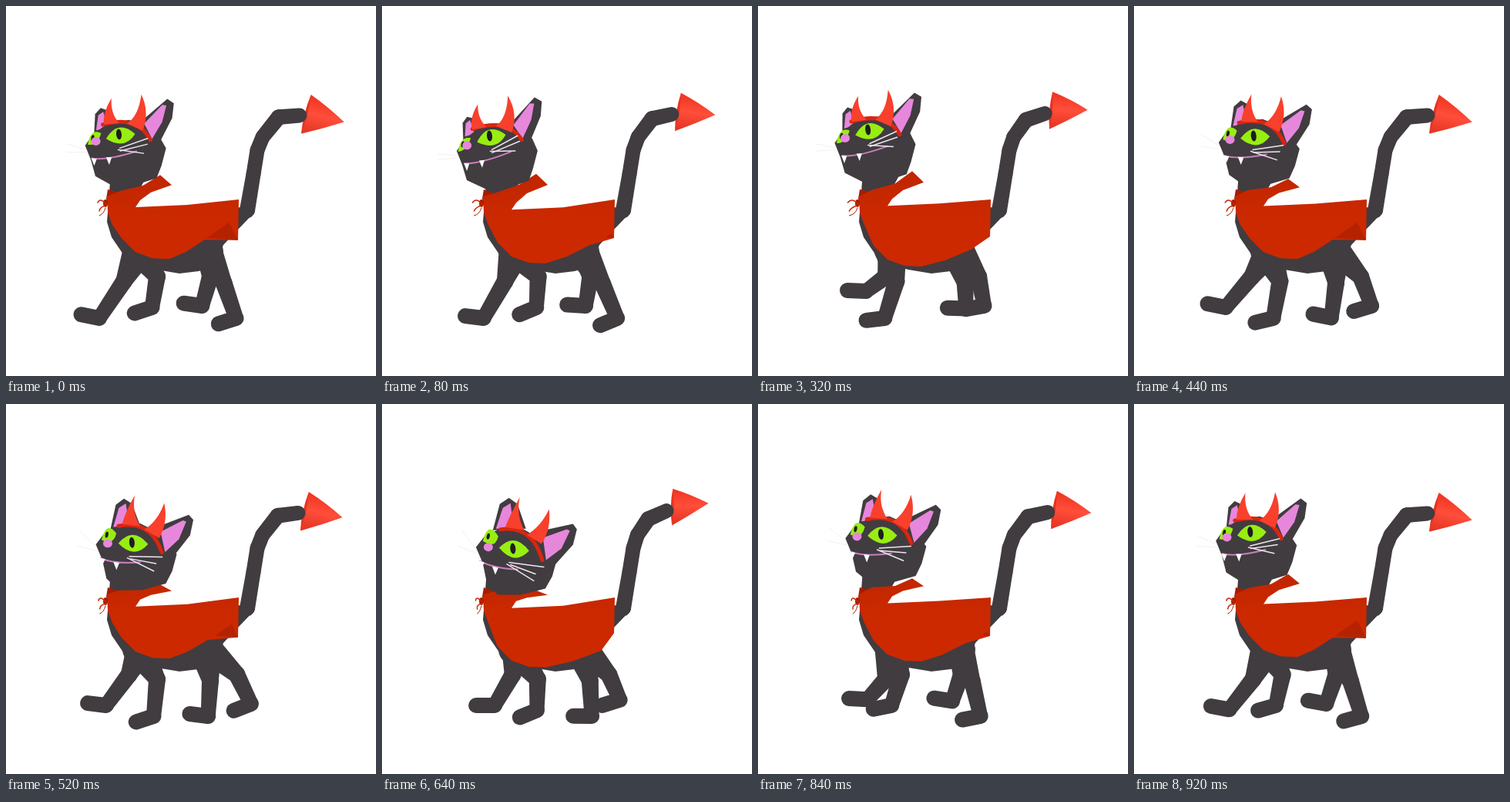
These frames come from a looping animation (480x480 px, 0.96 s). An HTML page with a canvas:

```html
<!DOCTYPE html>
<html lang="en">
<head>
<meta charset="utf-8">
<title>Walking devil cat</title>
<style>
html, body { margin: 0; width: 480px; height: 480px; overflow: hidden; background: #fff; }
canvas { display: block; }
</style>
</head>
<body>
<canvas id="stage" width="480" height="480"></canvas>
<script>
const ctx = document.getElementById('stage').getContext('2d');
const LOOP = 960, STEP = 40, STANCE = 0.63;
const FUR = '#403c40', CAPE = '#cc2900', CAPE_DARK = '#a51d00', RED = '#f8402c',
  PINK = '#e687db', GREEN = '#98ee12', INK = '#201c20';

// root: fixed joint; knee and heel: middle x, swing, y; rise: foot lift; lead: ms ahead in the gait
const LEGS = {
  frontFar: { root: [174, 320, 19], knee: [178, 25, 351], heel: [160, 41, 391], rise: 24, lead: 520 },
  rearFar: { root: [264, 319, 18], knee: [281, 20, 351], heel: [284, 37, 389], rise: 7, lead: 60 },
  frontNear: { root: [172, 318, 21], knee: [178, 25, 357], heel: [162, 41, 405], rise: 25, lead: 0 },
  rearNear: { root: [259, 318, 22], knee: [274, 12, 359], heel: [281, 25, 405], rise: 14, lead: 515 }
};

// Cosine that peaks at the given time, with the given number of cycles per loop.
const wave = (t, peak, cycles = 1) => Math.cos(2 * Math.PI * cycles * (t - peak) / LOOP);

function poly(p, fill) {
  ctx.beginPath();
  for (let i = 0; i < p.length; i += 2) ctx.lineTo(p[i], p[i + 1]);
  ctx.closePath();
  ctx.fillStyle = fill;
  ctx.fill();
}

// Two curves: start, control, end, control, finish (the start by default).
function leaf(p, fill) {
  ctx.beginPath();
  ctx.moveTo(p[0], p[1]);
  ctx.quadraticCurveTo(p[2], p[3], p[4], p[5]);
  ctx.quadraticCurveTo(p[6], p[7], p[8] ?? p[0], p[9] ?? p[1]);
  ctx.fillStyle = fill;
  ctx.fill();
}

function curve(p, color, width) {
  ctx.beginPath();
  ctx.moveTo(p[0], p[1]);
  ctx.quadraticCurveTo(p[2], p[3], p[4], p[5]);
  ctx.strokeStyle = color;
  ctx.lineWidth = width;
  ctx.stroke();
}

function line([ax, ay, bx, by], color, width) {
  curve([ax, ay, ax, ay, bx, by], color, width);
}

function oval([x, y], rx, ry, fill, tilt = 0) {
  ctx.beginPath();
  ctx.ellipse(x, y, rx, ry, tilt, 0, 7);
  ctx.fillStyle = fill;
  ctx.fill();
}

// Tapered tube through [x, y, radius] joints.
function limb(joints) {
  ctx.fillStyle = FUR;
  for (let i = 1; i < joints.length; i++) {
    const [ax, ay, ar] = joints[i - 1], [bx, by, br] = joints[i];
    const dir = Math.atan2(by - ay, bx - ax), q = Math.PI / 2;
    ctx.beginPath();
    ctx.arc(ax, ay, ar, dir + q, dir + 3 * q);
    ctx.arc(bx, by, br, dir - q, dir + q);
    ctx.fill();
  }
}

// The foot slides back evenly on the ground, then swings forward in an arc.
function drawLeg({ root, knee, heel, rise, lead }, t) {
  const phase = (t + lead) / LOOP % 1;
  const swing = Math.max(0, (phase - STANCE) / (1 - STANCE)) * Math.PI;
  const reach = swing ? Math.cos(swing) : 2 * phase / STANCE - 1;
  const x = heel[0] + heel[1] * reach, y = heel[2] - rise * Math.sin(swing);
  const tilt = 0.1 + 0.3 * reach;
  limb([root, [knee[0] + knee[1] * reach, knee[2], 11], [x, y, 9.5]]);
  limb([[x, y, 10], [x - 24 * Math.cos(tilt), y + 24 * Math.sin(tilt), 10]]);
}

function drawTail(bob) {
  const ax = 385 + 11 * bob, ay = 112 + 3 * bob;
  const bx = 430 + 9 * bob, by = 138 + 13 * bob;
  const cx = 379 + 4 * bob, cy = 161 + 5 * bob;
  const shade = ctx.createLinearGradient(ax, ay, cx, cy);
  shade.addColorStop(0, '#ee3420');
  shade.addColorStop(0.45, '#ff4e3a');
  shade.addColorStop(1, '#e03220');
  leaf([ax, ay, (ax + bx) / 2 + 1, (ay + by) / 2 - 2, bx, by, (bx + cx) / 2, (by + cy) / 2 + 1, cx, cy], shade);
  leaf([ax, ay, (ax + cx) / 2 - 4, (ay + cy) / 2, cx, cy, (ax + cx) / 2 + 4, (ay + cy) / 2], '#e83420');
  limb([[313, 265, 10], [321, 218, 9.5], [326, 187, 9.5], [332 + bob, 170, 9.5],
    [349 + 5 * bob, 147 - 3 * bob, 10], [374 + 7 * bob, 140 + 2 * bob, 9.5]]);
  poly([298, 262, 323, 258, 323, 267, 299, 292], FUR);
}

function drawCloak(t, bob, lift, turn) {
  const tipY = 231 + 17 * turn + 0.5 * lift, collarY = 216 + 26 * turn + 0.6 * lift;
  const backY = 265 + 0.5 * lift, lowY = 300 + 4 * bob;
  const hemX = 273 - 16 * bob, hemY = 313 - 10 * bob, base = 336 - 8 * bob;
  const shade = ctx.createLinearGradient(0, 220, 0, 275);
  shade.addColorStop(0, '#c02600');
  shade.addColorStop(1, CAPE);
  poly([132, 238, 166, backY - 14, 168, backY, 136, 272, 130, 250], CAPE_DARK);
  poly([131, 247, 148, 243 + 0.4 * lift, 178, (collarY + 246) / 2, 200, collarY, 215, tipY,
    188, (backY + tipY) / 2 - 5, 174, backY - 9, 168, backY, 235, backY - 3, 302, 251,
    301, lowY, hemX, hemY, (hemX + 210) / 2, (hemY + base) / 2 + 3, 212, base, 190, base - 1,
    168, base - 9, 150, base - 27, 138, 284, 132, 268], shade);
  const fold = Math.max(0, bob);
  poly([301, lowY, 301 - 12 * fold, lowY - 24 * fold, 301 - 42 * fold, lowY - 3 * fold], '#b52200');
  const sway = 3 * wave(t, 240);
  oval([129, 256], 3, 5, CAPE_DARK);
  curve([130, 257, 122, 248, 119 - sway, 255], CAPE, 1.5);
  curve([130, 259, 122, 260, 121 - sway, 266], CAPE, 1.5);
  curve([129, 262, 127, 270, 121 - sway, 272], CAPE_DARK, 1);
}

// Every head part blends from its place facing left to its place turned to the viewer.
function drawHead(lift, turn) {
  const mix = (left, right) =>
    left.map((v, i) => v + (right[i] - v) * turn + (i % 2 ? lift : 0));

  line(mix([68, 197, 95, 197], [103, 163, 121, 187]), '#f5eff4', 1);
  line(mix([70, 203, 97, 199], [99, 185, 122, 194]), '#f5eff4', 1);

  // Far ear, skull, near ear
  poly(mix([101, 178, 99, 156, 104, 148, 111, 149, 122, 166],
    [144, 164, 153, 130, 165, 122, 176, 130, 187, 162]), FUR);
  poly(mix([103, 172, 103, 156, 108, 152, 111, 158, 115, 168],
    [148, 162, 157, 135, 167, 129, 169, 145, 166, 162]), PINK);
  poly(mix(
    [94, 190, 101, 208, 107, 227, 133, 238, 160, 237, 188, 227, 193, 211,
      199, 188, 193, 172, 178, 160, 150, 153, 120, 161, 103, 176],
    [122, 186, 131, 207, 136, 232, 150, 248, 180, 248, 212, 240, 221, 224,
      227, 202, 212, 188, 205, 175, 180, 161, 155, 161, 133, 172]), FUR);
  poly(mix([160, 155, 192, 116, 202, 121, 201, 140, 188, 175, 174, 174],
    [207, 165, 248, 156, 253, 163, 248, 183, 222, 212, 209, 202]), FUR);
  poly(mix([166, 154, 186, 124, 192, 124, 189, 145, 179, 170],
    [209, 174, 240, 163, 244, 165, 233, 188, 213, 203]), PINK);

  // Headband and horns
  curve(mix([113, 161, 160, 145, 178, 172], [154, 163, 195, 157, 208, 203]), '#d8260f', 5);
  leaf(mix([112, 162, 107, 147, 118, 130, 118, 148, 130, 158],
    [160, 160, 166, 145, 179, 121, 174, 145, 185, 164]), RED);
  leaf(mix([143, 156, 157, 146, 157, 116, 172, 138, 164, 164],
    [188, 170, 206, 160, 217, 137, 220, 163, 207, 182]), RED);

  // Eyes and nose
  leaf(mix([95, 192, 97, 172, 111, 173, 106, 190], [131, 178, 138, 151, 151, 172, 147, 189]), GREEN);
  oval(mix([101, 182], [138, 172]), 2, 4, INK, 0.2);
  leaf(mix([120, 177, 133, 149, 157, 166, 146, 188], [152, 187, 172, 166, 191, 191, 172, 211]), GREEN);
  oval(mix([136, 168], [170, 188]), 3.5, 7, INK, -0.1);
  oval(mix([107, 182], [138, 186]), 6, 5.5, PINK);

  // Mouth, fangs and whiskers
  curve(mix([105, 206, 125, 206, 166, 188], [127, 204, 145, 214, 176, 215]), '#c97fbc', 2);
  poly(mix([104, 206, 111, 206, 108, 216], [125, 203, 133, 206, 129, 213]), '#fff');
  poly(mix([124, 201, 131, 200, 128, 210], [143, 211, 151, 213, 147, 222]), '#fff');
  line(mix([140, 186, 172, 165], [165, 206, 210, 212]), '#eee6ee', 1.5);
  line(mix([140, 190, 176, 172], [167, 209, 199, 221]), '#eee6ee', 1.5);
  line(mix([138, 188, 170, 185], [162, 208, 197, 230]), '#eee6ee', 1.5);
}

function draw(now) {
  const t = Math.floor(now % LOOP / STEP) * STEP;
  const bob = wave(t, -20, 2);
  const lift = 6.5 * (wave(t, 135, 2) - 1);
  const turn = 0.5 + 0.5 * wave(t, 660);
  ctx.fillStyle = '#fff';
  ctx.fillRect(0, 0, 480, 480);
  ctx.lineCap = 'round';
  drawLeg(LEGS.frontFar, t);
  drawLeg(LEGS.rearFar, t);
  drawTail(bob);
  poly([136, 215, 186, 215, 172, 240, 160, 268, 298, 262, 299, 292, 282, 310, 272, 336,
    250, 344, 225, 347, 195, 342, 172, 336, 152, 322, 137, 300, 131, 280, 133, 255], FUR);
  drawLeg(LEGS.rearNear, t);
  drawLeg(LEGS.frontNear, t);
  drawCloak(t, bob, lift, turn);
  drawHead(lift, turn);
}

const start = performance.now();
function tick() {
  draw(performance.now() - start);
  requestAnimationFrame(tick);
}
tick();
</script>
</body>
</html>
```
